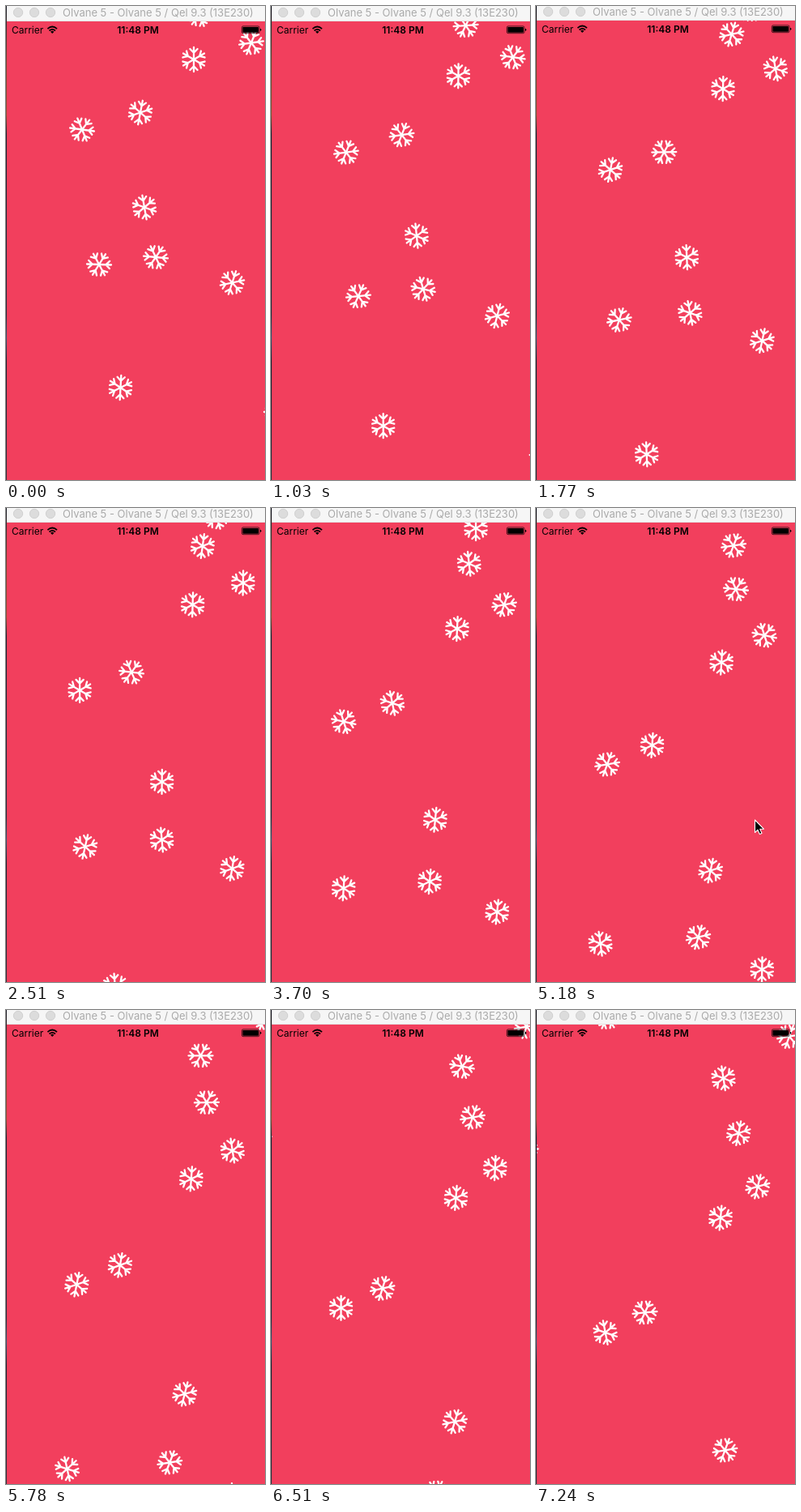
Animation, 320 px wide and 585 px high, one loop 7340 ms. Source, as an HTML page:

```html
<!DOCTYPE html>
<html lang="en">
<head>
<meta charset="utf-8">
<title>Snowfall</title>
<style>
  html, body { margin: 0; width: 100%; height: 100%; overflow: hidden; background: #f23f5d; }
  svg { display: block; width: 320px; height: 585px; }
  text { font-family: Inter, "Liberation Sans", sans-serif; }
</style>
</head>
<body>
<svg viewBox="0 0 320 585" xmlns="http://www.w3.org/2000/svg">
  <defs>
    <g id="arm"><path d="M0 0V-15M-4.6 -13L0 -8.3L4.6 -13"/></g>
    <g id="flake" fill="none" stroke="#fff" stroke-width="2.3" stroke-linecap="round"></g>
    <linearGradient id="desktop" x2="0" y2="1">
      <stop offset="0" stop-color="#20222e"/>
      <stop offset=".12" stop-color="#70452f"/>
      <stop offset=".23" stop-color="#8b5133"/>
      <stop offset=".27" stop-color="#1d2030"/>
      <stop offset=".65" stop-color="#292b3c"/>
      <stop offset=".7" stop-color="#3c5470"/>
      <stop offset=".75" stop-color="#1d2030"/>
      <stop offset="1" stop-color="#33303c"/>
    </linearGradient>
  </defs>

  <rect width="320" height="585" fill="#f23f5d"/>
  <g id="snow"></g>
  <rect width="1" height="585" fill="url(#desktop)"/>

  <g id="chrome">
    <rect x="1" y="-2" width="319" height="20" fill="#f6f6f6"/>
    <rect x="1" y="17.4" width="319" height=".6" fill="#d9d4d5"/>
    <g fill="#dcdcdc" stroke="#cbcbcb" stroke-width=".8">
      <circle cx="15" cy="7" r="5.7"/>
      <circle cx="35" cy="7" r="5.7"/>
      <circle cx="55" cy="7" r="5.7"/>
    </g>
    <text x="70" y="12" font-size="13" fill="#aaa">Olvane 5 - Olvane 5 / Qel 9.3 (13E230)</text>

    <text x="7" y="32.6" font-size="12">Carrier</text>
    <text x="163" y="32.6" font-size="12" font-weight="600" text-anchor="middle">11:48 PM</text>
    <g fill="none" stroke="#000" stroke-width="1.7">
      <path d="M51.4 27.2Q57.2 21.8 63 27.2M53.5 29.5Q57.2 26.1 60.9 29.5"/>
      <path d="M55 30.8Q57.2 28.9 59.4 30.8L57.2 33Z" fill="#000" stroke="none"/>
    </g>
    <rect x="291.4" y="23.9" width="21.6" height="8.8" rx="1.6" fill="none" stroke="#000" stroke-width=".7"/>
    <rect x="292.4" y="24.9" width="19.6" height="6.8" rx=".7"/>
    <path d="M314 26.7Q315.4 26.9 315.4 28.3T314 29.9Z"/>
  </g>

  <path id="cursor" d="M270.5 385V400.5L274 397.2L276.4 402.6L279 401.4L276.7 396.2H281.4Z"
        stroke="#fff" stroke-width="1.1" stroke-linejoin="round"/>
</svg>
<script>
const LOOP = 7340, STEP = 147.76, GRAVITY = 1.08e-6;
const byId = id => document.getElementById(id);

// x, y, horizontal speed, vertical speed (px/s), angle, spin (deg/s)
const flakes = [
  [232, 66, -.55, 18.5, 0, .7],
  [303, 45.5, -4.02, 16, -38, 15.5],
  [166, 131.5, -4.35, 25.6, 11, 10.2],
  [94, 152.5, -1.15, 26.1, 37.7, -15],
  [171, 248.5, 8.63, 32.9, -10, 4.2],
  [185, 310, 3, 36.9, -25, 8],
  [115, 319, -6.85, 36.7, 32, -7.7],
  [279.5, 341.5, -.04, 38.5, 18, -3.3],
  [141.5, 471, -2.7, 44.5, 3, -3],
  [239, 10.8, 1.55, 11.7, 38, -12],
  [275.5, -7.8, -6.07, 4.9, 6.4, 14.5],
  [340.5, -34.8, -3.8, 1.5, 20, 0],
  [90, -47.6, -.3, 0, 25, 0],
  [-32, 73.6, 2.7, 5.7, 30, 0],
  [334, 501, .7, 50.2, 30, 0]
];

const use = (parent, href) => {
  const node = document.createElementNS("http://www.w3.org/2000/svg", "use");
  node.setAttribute("href", href);
  return parent.appendChild(node);
};
for (let i = 0; i < 6; i++)
  use(byId("flake"), "#arm").setAttribute("transform", `rotate(${i * 60})`);
const nodes = flakes.map(() => use(byId("snow"), "#flake"));

function render(time) {
  const t = Math.floor((time + 6) / STEP) * STEP, s = t / 1000;
  flakes.forEach(([x, y, vx, vy, angle, spin], i) => {
    const px = x + vx * s, py = y + vy * s + GRAVITY * t * t;
    nodes[i].setAttribute("transform",
      `translate(${px.toFixed(2)} ${py.toFixed(2)}) rotate(${(angle + spin * s).toFixed(2)})`);
  });
  byId("chrome").setAttribute("transform", `translate(0 ${time < 1400 ? 1 : 0})`);
  byId("cursor").style.display = time >= 5000 && time < 5460 ? "" : "none";
}

const start = performance.now();
function tick() {
  render((performance.now() - start) % LOOP);
  requestAnimationFrame(tick);
}
tick();
</script>
</body>
</html>
```
